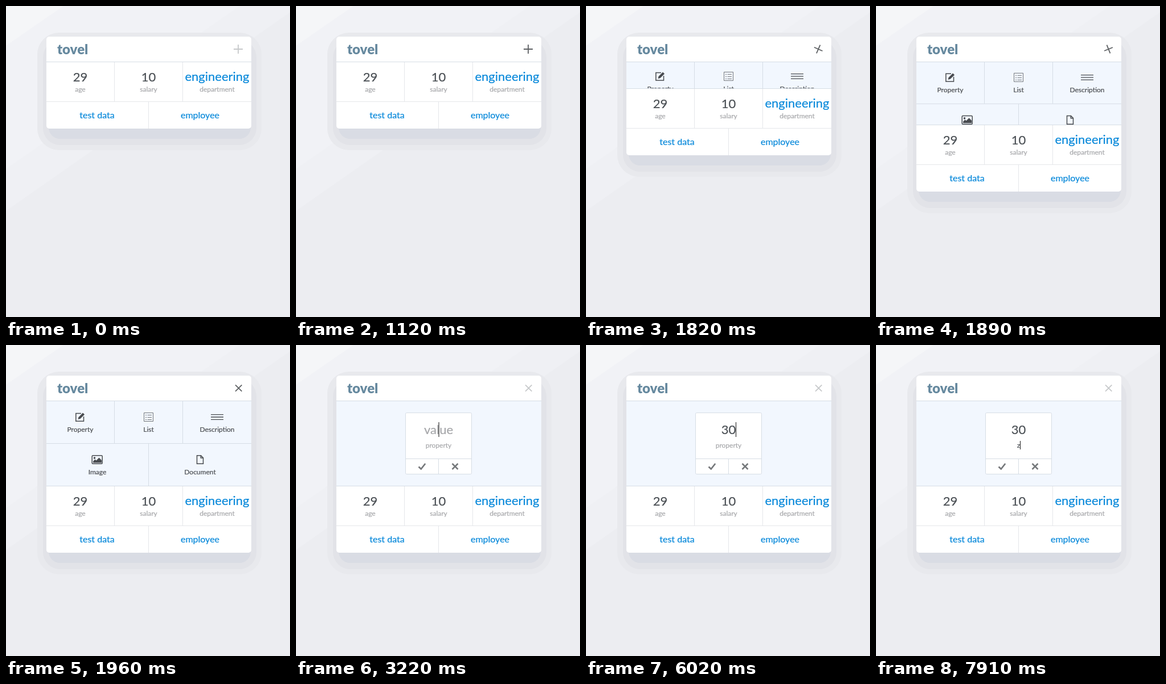
Write an HTML page that moves like this. It is 499 by 548 pixels and loops after 8000 ms.

```html
<!DOCTYPE html>
<html lang="en">
<head>
<meta charset="utf-8">
<title>Record card</title>
<style>
  html, body { margin: 0; width: 100%; height: 100%; overflow: hidden; background: #ecedf1; }
  svg { display: block; }
  text { font-family: Lato, sans-serif; font-size: 12px; text-anchor: middle; fill: currentColor;
         stroke: currentColor; stroke-width: .2px; }
  .title { font-size: 24px; font-weight: 900; text-anchor: start; color: #66899f; stroke: none; }
  .big { font-size: 22px; color: #4a4f54; }
  .mid { font-size: 16px; }
  .soft { color: #a5a6a9; }
  .link { color: #0788da; }
  .item { color: #484b4f; }
  .item.hover { color: #1d1f21; }
  .icon { fill: none; stroke: currentColor; stroke-width: 1.5; }
  .solid { fill: currentColor; stroke: none; }
  .rule { fill: none; stroke: #e5e7ea; }
  .edge { fill: none; stroke: #d6dde5; }
</style>
</head>
<body>
<svg width="499" height="548" viewBox="0 0 499 548">
  <defs>
    <clipPath id="menuClip"><rect id="menuArea" x="71" y="99" width="360" height="0"/></clipPath>
  </defs>

  <rect width="499" height="548" fill="#ecedf1"/>
  <path d="M0 0H499V11L0 361Z" fill="#eff0f4"/>
  <path d="M0 0H410L0 287Z" fill="#f1f2f6"/>
  <path d="M0 0H101L0 70Z" fill="#f5f6f8"/>

  <rect class="grow" x="55" y="47" width="394" height="207" rx="38" fill="#e8e9ed"/>
  <rect class="grow" x="65" y="60" width="375" height="185" rx="30" fill="#e2e3e8"/>
  <rect class="grow" x="75" y="70" width="355" height="164" rx="20" fill="#d9dce4"/>
  <rect class="grow" x="71" y="54" width="360" height="162" rx="5" fill="#fff"/>

  <text class="title" x="90" y="85">tovel</text>
  <path id="toggle" d="M-8 0H8M0-8V8" fill="none" stroke-width="1.8"/>

  <g clip-path="url(#menuClip)">
    <rect x="71" y="99" width="360" height="150" fill="#f2f7fe"/>
    <g id="menu">
      <path class="edge" d="M190.5 90V173M310.5 90V173M71 173.5H431M250.5 174V249"/>
      <g class="item" id="property">
        <path class="icon" d="M132 120.5H122.8V134.2H136.5V126"/>
        <path class="solid" d="M126.5 131L127.5 127.2L135 119.6L138 122.6L130.4 130Z"/>
        <text x="130.5" y="153">Property</text>
      </g>
      <g class="item" id="list">
        <path class="icon" style="stroke-width:1;opacity:.75"
          d="M242.5 119.5H258.5V134.5H242.5ZM245 123.5H247M248.500 123.5H256M245 127.5H247M248.5 127.5H256M245 131.500H247M248.5 131.5H256"/>
        <text x="250.5" y="153">List</text>
      </g>
      <g class="item">
        <path class="icon" style="stroke-width:1.3" d="M360 122.7H382M360 127H382M360 131.3H382"/>
        <text x="371" y="153">Description</text>
      </g>
      <g class="item">
        <rect class="icon" x="151.2" y="194.700" width="18" height="14.600" rx="1.500"/>
        <circle class="solid" cx="155.500" cy="199" r="1.800"/>
        <path class="solid" d="M153 207.500V205L156.500 201.500L158.500 203.500L163.500 198.500L168 203V207.500Z"/>
        <text x="160.5" y="228">Image</text>
      </g>
      <g class="item">
        <path class="icon" d="M335.500 194.700H342.500L346.500 198.700V209.300H335.500ZM342.300 195V199H346.500"/>
        <text x="341" y="228">Document</text>
      </g>
    </g>
    <g id="form">
      <rect class="edge" x="192.5" y="119.5" width="116" height="108" rx="2" style="fill:#fff"/>
      <path class="edge" d="M193 200.5H308M250.5 201V227"/>
      <text class="big" id="value" x="250.5" y="157"></text>
      <text id="name" x="250.5" y="181"></text>
      <path id="caret" fill="none" stroke="#333" stroke-width="1.2"/>
      <path d="M215.500 214.500L219.700 218.500L227.200 209" fill="none" stroke="#75787b" stroke-width="2.700"/>
      <path d="M274.500 209L284.500 219M284.500 209L274.500 219" fill="none" stroke="#75787b" stroke-width="2.500"/>
    </g>
  </g>
  <path class="edge" d="M71 98.5H431"/>

  <g id="data">
    <path class="rule" d="M190.5 99V168M310.5 99V168M71 168.500H431M250.5 169V216"/>
    <path class="edge" d="M71 98.5H431"/>
    <text class="big" x="130.5" y="133">29</text>
    <text class="big" x="250.5" y="133">10</text>
    <text class="big link" x="371" y="132">engineering</text>
    <text class="soft" x="130.5" y="151">age</text>
    <text class="soft" x="250.5" y="151">salary</text>
    <text class="soft" x="371" y="151">department</text>
    <text class="mid link" x="160" y="198">test data</text>
    <text class="mid link" x="341" y="198">employee</text>
  </g>
</svg>
<script>
const LOOP = 8000, MENU = 150;
const $ = id => document.getElementById(id);

// [time, menu height, toggle angle]
const opening = [[0, 0, 0], [1680, 0, -2], [1750, 5, -8], [1820, 47, -66], [1890, 111, -112], [1960, MENU, -135]];

// [time, hovered control]
const hovers = [[0, ''], [1120, 'toggle'], [2520, 'list'], [2870, 'property'], [3220, '']];

// [time, value, name, caret field, caret x]
const typing = [
  [0, '', '', '', 0],
  [3220, '', '', 'value', 251], [3710, '', '', '', 0],
  [4270, '', '', 'value', 251], [4760, '', '', '', 0],
  [5320, '', '', 'value', 251],
  [5810, '3', '', 'value', 257.5], [6020, '30', '', 'value', 263.5],
  [6510, '30', '', 'name', 251],
  [6930, '30', 'ag', 'name', 257.5], [7070, '30', 'age', 'name', 260.5],
  [7630, '30', 'ag', 'name', 257.5], [7770, '30', '', 'name', 251],
  [7910, '30', 'z', 'name', 253.5]
];
const caretSpan = { value: [136, 162], name: [169, 184] };

const at = (steps, t) => steps.findLast(step => step[0] <= t);
const boxes = [...document.querySelectorAll('.grow')].map(el => [el, +el.getAttribute('height')]);

function field(id, text, placeholder) {
  const el = $(id);
  el.textContent = text || placeholder;
  el.style.color = text ? '#4a4f54' : '#a5a6a9';
}

function draw(t) {
  const [, height, angle] = at(opening, t);
  const [, hover] = at(hovers, t);
  const [, value, name, focus, x] = at(typing, t);
  const editing = t >= 3220;

  boxes.forEach(([el, base]) => el.setAttribute('height', base + height));
  $('data').setAttribute('transform', `translate(0 ${height})`);
  $('menuArea').setAttribute('height', height);
  $('menu').setAttribute('transform', `translate(0 ${-4.5 * (1 - height / MENU)})`);
  $('menu').style.display = editing ? 'none' : '';
  $('form').style.display = editing ? '' : 'none';

  $('toggle').setAttribute('transform', `translate(${408 + height / MENU * .7} 76) rotate(${angle})`);
  $('toggle').setAttribute('stroke', hover === 'toggle' ? '#5d6063' : '#c6c8ca');
  for (const id of ['property', 'list']) $(id).classList.toggle('hover', hover === id);

  field('value', value, 'value');
  field('name', name, 'property');
  const span = caretSpan[focus];
  $('caret').setAttribute('d', span ? `M${x} ${span[0]}V${span[1]}` : '');
}

const start = performance.now();
function tick() {
  draw((performance.now() - start) % LOOP);
  requestAnimationFrame(tick);
}
tick();
</script>
</body>
</html>
```
